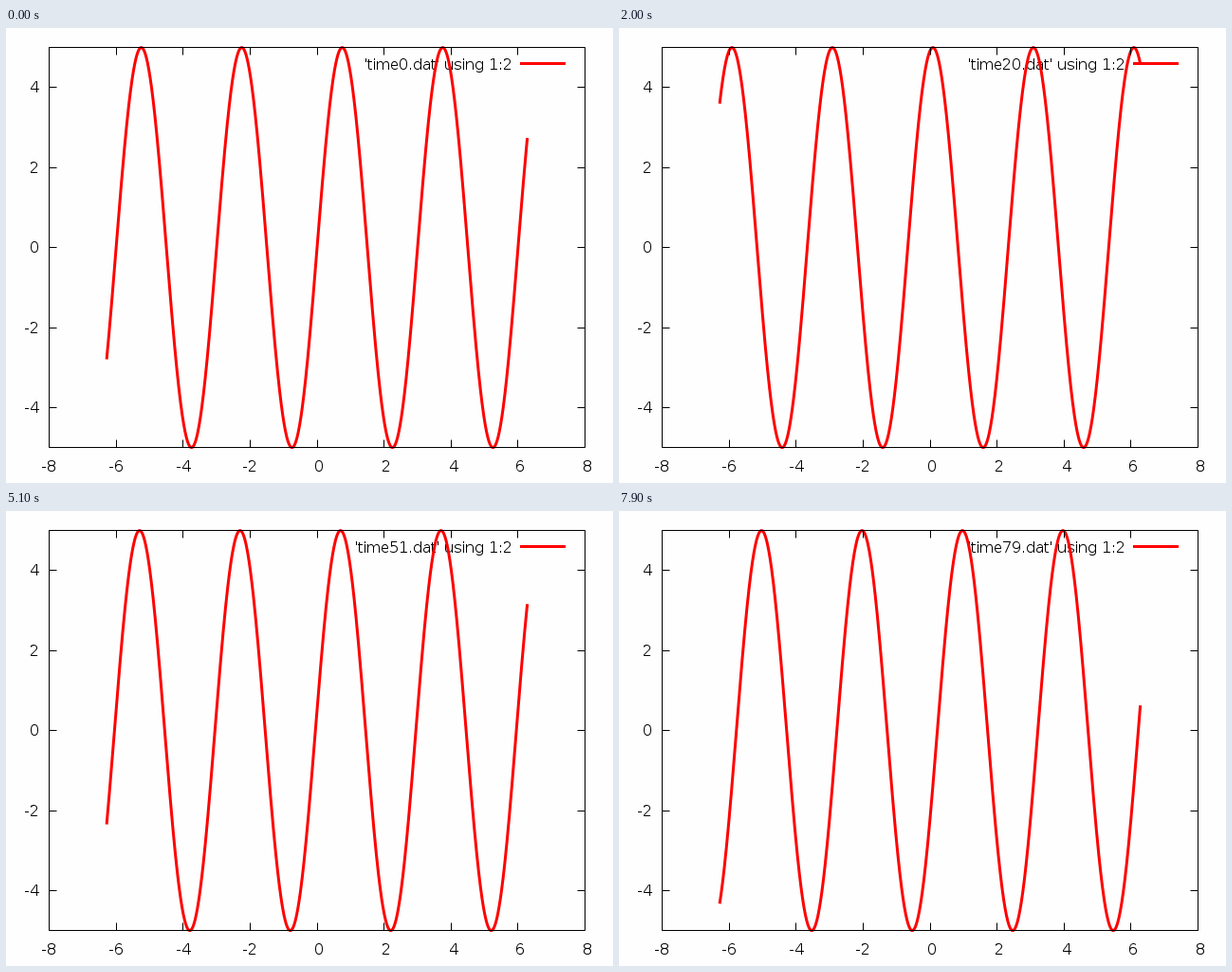
A matplotlib script that plays this animation: 640x480 px, repeating every 8000 ms.

```python
import numpy as np
import matplotlib.pyplot as plt
from matplotlib.animation import FuncAnimation

W, H, DPI = 640, 480, 100
FRAMES, STEP_MS = 80, 100
LEFT, RIGHT, TOP, BOTTOM = 45.5, 610.5, 20.6, 442.6
AMP, WAVELENGTH, SPEED = 5, 3, 7 / 60
PX = 72 / DPI  # points per pixel
TICK = 8

plt.rcParams.update({
    "font.family": "DejaVu Sans",
    "font.size": 16 * PX,
    "text.hinting": "default",
    "text.hinting_factor": 1,  # whole-pixel letter advances
})

fig = plt.figure(figsize=(W / DPI, H / DPI), dpi=DPI, facecolor="#fefefe")
ax = fig.add_axes([0, 0, 1, 1])
ax.set(xlim=(0, W), ylim=(H, 0))
ax.axis("off")


def to_x(v):
    return LEFT + (v + 8) * (RIGHT - LEFT) / 16


def to_y(v):
    return BOTTOM - (v + AMP) * (BOTTOM - TOP) / (2 * AMP)


def rule(xs, ys):
    """Thin black line through pixel centres."""
    ax.plot(np.floor(xs) + 0.5, np.floor(ys) + 0.5, color="black", lw=PX,
            zorder=3, snap=False, solid_capstyle="butt",
            solid_joinstyle="miter")


def red_line(xs, ys):
    return ax.plot(xs, ys, color="red", lw=3 * PX, zorder=2, snap=False,
                   solid_capstyle="butt", solid_joinstyle="round")[0]


def label(x, y, text, ha):
    return ax.text(x, y, text, ha=ha, va="baseline", zorder=1)


rule([LEFT, RIGHT, RIGHT, LEFT, LEFT], [TOP, TOP, BOTTOM, BOTTOM, TOP])

for v in range(-8, 9, 2):
    x = to_x(v)
    if abs(v) < 8:
        rule([x, x], [BOTTOM, BOTTOM - TICK])
        rule([x, x], [TOP, TOP + TICK])
    # non-negative labels keep room for a sign
    label(x + (2.5 if v >= 0 else 0), 468, str(v), "center")

for v in range(-4, 5, 2):
    y = to_y(v)
    rule([LEFT, LEFT + TICK], [y, y])
    rule([RIGHT, RIGHT - TICK], [y, y])
    label(35, np.floor(y) + 6, str(v), "right")

key = label(533.5, 44, "", "right")
red_line([542, 590], [37.5, 37.5])

xs = np.arange(-2 * np.pi, 2 * np.pi, 0.01)
wave = red_line(to_x(xs), to_y(0 * xs))


def update(i):
    ys = AMP * np.sin(2 * np.pi / WAVELENGTH * (xs - SPEED * i))
    wave.set_ydata(to_y(ys))
    key.set_text(f"'time{i}.dat' using 1:2")
    return wave, key


anim = FuncAnimation(fig, update, frames=FRAMES, interval=STEP_MS,
                     repeat=True, repeat_delay=0)
plt.show()
```
